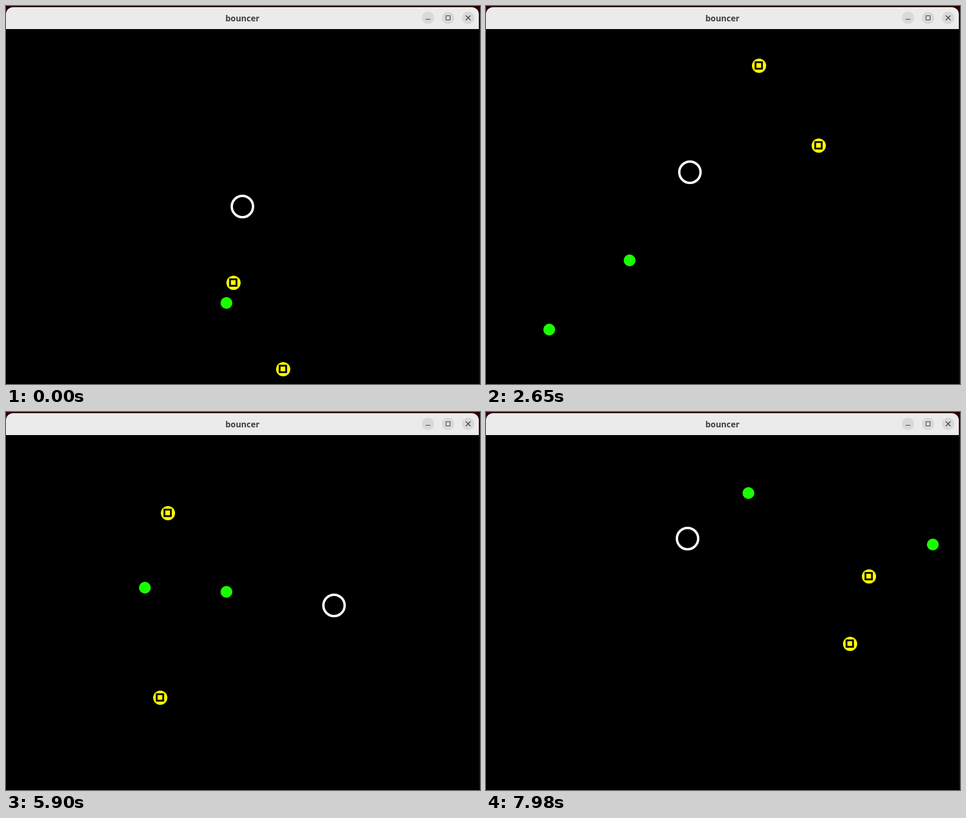
An HTML page with a canvas that plays this animation: 802 px wide and 639 px high, repeating every 8000 ms.

```html
<!DOCTYPE html>
<html lang="en">
<head>
<meta charset="utf-8">
<title>bouncer</title>
<style>
  html, body { margin: 0; width: 100%; height: 100%; overflow: hidden; background: #000; }
  canvas { display: block; }
</style>
</head>
<body>
<canvas id="stage" width="802" height="639"></canvas>
<script>
const ctx = document.getElementById('stage').getContext('2d');
const LOOP = 8000, STEP = 33.53, LAST = 238;
const INK = '#3d3d3d';
const WALL = 8.5, FLOOR = 627.4;

// Drifters fly straight; x, y is where they are at step REF.
const REF = 52;
const drifters = [
  { x: 198.7, y: 617.65, vx: -3.364, vy: -2.58, born: 0 },
  { x: 410, y: 465, vx: -6.178, vy: -1.292, born: REF / 2 }
];

// Key points the smooth paths pass through, as [step, x, y].
const ringPath = [
  [0, 400, 339], [16, 400, 340], [52, 404, 394], [79, 345, 281], [120, 405, 217],
  [153, 487, 237], [174, 553, 320], [197, 529, 403], [208, 480, 452], [238, 341, 214]
];
const turns = [0, 52, 79, 120, 153, 197, LAST];
const chasers = [
  [[385, 468], [425, 155], [462, 101], [345, 433], [244, 535], [338, 400], [648, 278]],
  [[469, 614], [491, 267], [563, 236], [387, 262], [233, 207], [372, 178], [616, 392]]
].map(points => points.map((point, i) => [turns[i], ...point]));

const slope = (p, i, c) => (p[i + 1][c] - p[i][c]) / (p[i + 1][0] - p[i][0]);

// Key point velocity: time-weighted mean of both sides, extrapolated at the ends.
function tangent(p, i, c) {
  const last = p.length - 1;
  if (i === 0) return 2 * slope(p, 0, c) - tangent(p, 1, c);
  if (i === last) return 2 * slope(p, last - 1, c) - tangent(p, last - 1, c);
  const before = p[i][0] - p[i - 1][0], after = p[i + 1][0] - p[i][0];
  return (after * slope(p, i - 1, c) + before * slope(p, i, c)) / (before + after);
}

function glide(p, n) {
  let i = 0;
  while (i < p.length - 2 && n >= p[i + 1][0]) i++;
  const span = p[i + 1][0] - p[i][0];
  const u = (n - p[i][0]) / span, v = 1 - u;
  return [1, 2].map(c => Math.round(
    v * v * (1 + 2 * u) * p[i][c] + u * u * (3 - 2 * u) * p[i + 1][c] +
    span * u * v * (v * tangent(p, i, c) - u * tangent(p, i + 1, c))));
}

// Mirroring at the left wall and the floor gives the bounce.
function drift({ x, y, vx, vy }, n) {
  const age = n - REF;
  return [
    Math.floor(WALL + Math.abs(x + vx * age - WALL)),
    Math.floor(FLOOR - Math.abs(y + vy * age - FLOOR))
  ];
}

function disc(x, y, r, color) {
  ctx.fillStyle = color;
  ctx.beginPath();
  ctx.arc(x, y, r, 0, 2 * Math.PI);
  ctx.fill();
}

function drawWindow() {
  ctx.fillStyle = '#2a0008';
  ctx.fillRect(0, 0, 802, 639);
  ctx.fillStyle = '#000';
  ctx.fillRect(0, 39, 800, 600);
  ctx.fillStyle = '#ebebeb';
  ctx.beginPath();
  ctx.roundRect(0, 2, 800, 37, [12, 12, 0, 0]);
  ctx.fill();

  ctx.fillStyle = INK;
  ctx.font = 'bold 14px "Noto Sans", "Open Sans", sans-serif';
  ctx.textAlign = 'center';
  ctx.fillText('bouncer', 400, 26);

  for (const x of [714, 748, 782]) disc(x, 20, 10.5, '#d9d9d9');
  ctx.fillStyle = INK;
  ctx.fillRect(710, 22, 8, 1);
  ctx.strokeStyle = INK;
  ctx.lineWidth = 1;
  ctx.strokeRect(744.5, 16.5, 7, 7);
  ctx.lineWidth = 1.4;
  ctx.beginPath();
  ctx.moveTo(778, 16);
  ctx.lineTo(786, 24);
  ctx.moveTo(786, 16);
  ctx.lineTo(778, 24);
  ctx.stroke();
}

function drawChaser([x, y]) {
  disc(x, y, 12, '#ffff00');
  ctx.strokeStyle = '#000';
  ctx.lineWidth = 3;
  ctx.strokeRect(x - 6, y - 6, 11, 11);
}

function drawRing([x, y]) {
  ctx.strokeStyle = '#fff';
  ctx.lineWidth = 4;
  ctx.beginPath();
  ctx.arc(x, y, 18, 0, 2 * Math.PI);
  ctx.stroke();
}

function draw(time) {
  const n = Math.min(LAST, Math.floor((time % LOOP + 8) / STEP));
  drawWindow();
  for (const ball of drifters) {
    if (n >= ball.born) disc(...drift(ball, n), 10, '#1aff00');
  }
  for (const path of chasers) drawChaser(glide(path, n));
  drawRing(glide(ringPath, n));
}

const start = performance.now();
function tick() {
  draw(performance.now() - start);
  requestAnimationFrame(tick);
}
tick();
</script>
</body>
</html>
```
